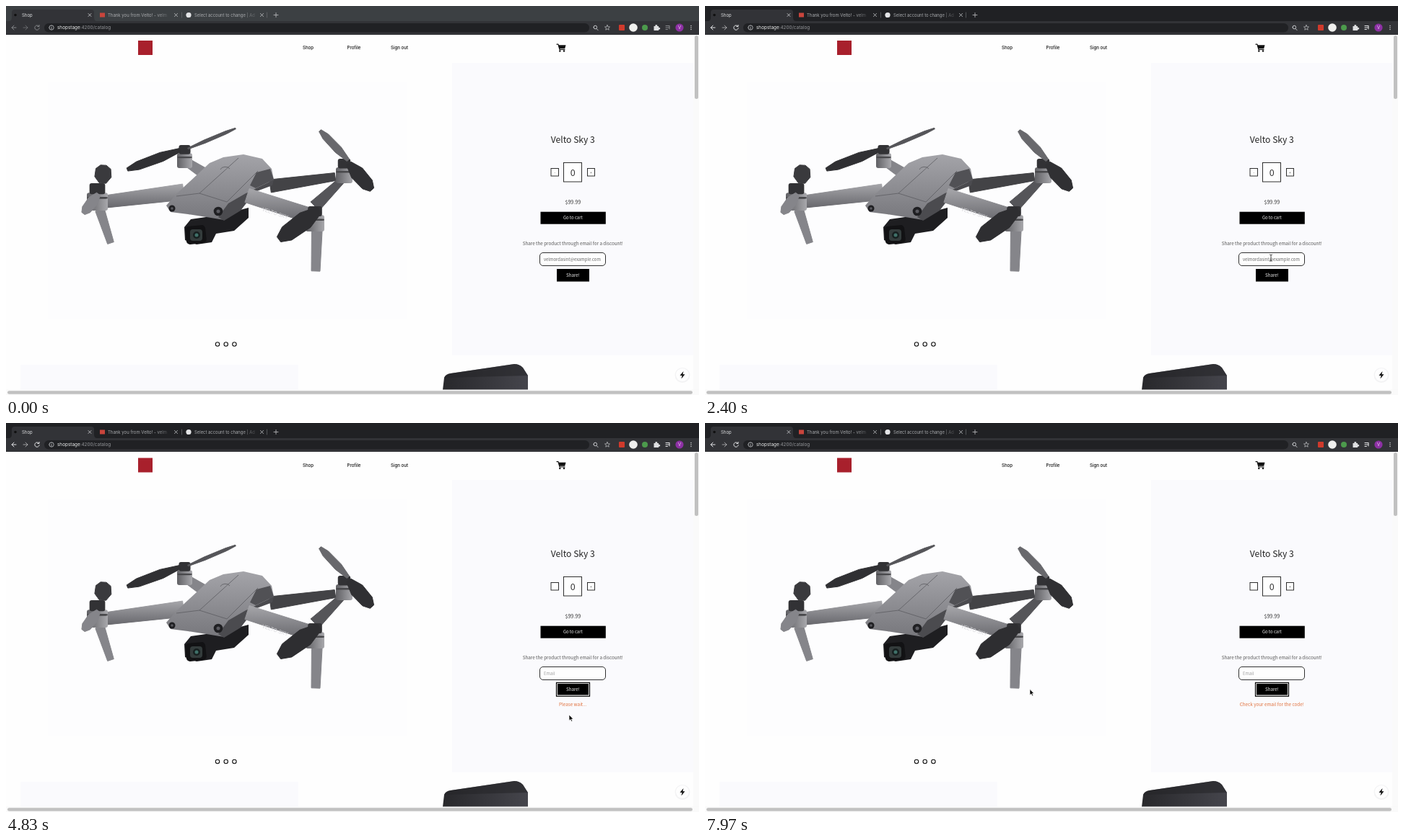
An HTML page for the animation above (8000 ms loop, 960x540 px).

```html
<!DOCTYPE html>
<html lang="en">
<head>
<meta charset="utf-8">
<title>Shop</title>
<style>
html, body { margin: 0; width: 100%; height: 100%; overflow: hidden; background: #fefefe; }
svg { display: block; width: 960px; height: 540px; }
.ui { font-family: Inter, Roboto, sans-serif; }
.shop { font-family: "Noto Sans CJK JP", "Noto Sans CJK SC", "Noto Sans CJK", "Open Sans", sans-serif; font-weight: 300; }
.mid { text-anchor: middle; }
.icon { fill: none; stroke: currentColor; stroke-linecap: round; stroke-linejoin: round; }
</style>
</head>
<body>
<svg id="stage" viewBox="0 0 960 540"></svg>
<script>
const LOOP = 8000;
const WINDOW_FOCUS = 1500, INPUT_SETTLE = 3400, PRESS = 3830, SENT = 4150, DONE = 7720;

const rect = (x, y, w, h, fill, more = "") => `<rect x="${x}" y="${y}" width="${w}" height="${h}" fill="${fill}" ${more}/>`;
const disc = (x, y, r, fill, more = "") => `<circle cx="${x}" cy="${y}" r="${r}" fill="${fill}" ${more}/>`;
const path = (d, fill, more = "") => `<path d="${d}" fill="${fill}" ${more}/>`;
const line = (d, width = 1, more = "") => `<path class="icon" d="${d}" stroke-width="${width}" ${more}/>`;
const text = (x, y, str, size, fill, more = "") => `<text x="${x}" y="${y}" font-size="${size}" fill="${fill}" ${more}>${str}</text>`;
const ramp = (id, from, to, dir = 'x2="0" y2="1"') =>
  `<linearGradient id="${id}" ${dir}><stop stop-color="${from}"/><stop offset="1" stop-color="${to}"/></linearGradient>`;
const fade = (id, x) =>
  `<linearGradient id="${id}" gradientUnits="userSpaceOnUse" x1="${x}" x2="${x + 20}"><stop stop-color="#a9abae"/><stop offset="1" stop-color="#a9abae" stop-opacity="0.1"/></linearGradient>`;

const defs = `<defs>
  ${ramp("shell", "#a4a4a9", "#77777c")}
  ${ramp("arm", "#a6a6aa", "#67676c")}
  ${ramp("dark", "#4a4a4d", "#242426")}
  ${ramp("metal", "#606064", "#a8a8ac", "")}
  ${ramp("bag", "#28282b", "#45454c", "")}
  ${fade("fadeMail", 208)}${fade("fadeAdmin", 328)}
</defs>`;

function browser() {
  const close = x => line(`M${x - 2} 10.5l4 4m0-4l-4 4`, 0.9);
  const rows = [27.5, 30, 32.5];
  return `<g class="ui">
    ${rect(0, 0, 960, 40, "", 'id="strip"')}
    ${path("M4 21Q8 21 8 16V9Q8 5 12 5H118Q122 5 122 9V16Q122 21 126 21H960V40H0V21Z", "#323337")}
    ${rect(53, 24, 755, 12.5, "#202124", 'rx="6.2"')}
    ${disc(13, 12.5, 1.8, "#111")}
    ${text(22, 14.8, "Shop", 6, "#dedfe1")}
    ${rect(130, 9.5, 7, 6, "#c9453c")}
    ${text(141, 14.8, "Thank you from Velto! - velm", 6, "url(#fadeMail)")}
    ${disc(253, 12.5, 3.6, "#e4e5e7")}
    ${text(261, 14.8, "Select account to change | Ad", 5.9, "url(#fadeAdmin)")}
    <g color="#c0c2c5">${[116, 235.5, 354.5].map(close).join("")}${line("M371 12.5h6m-3-3v6", 0.8)}</g>
    <g color="#6a6c70">${line("M243.5 9v7M361.5 9v7", 0.7)}</g>
    <g id="tools">
      ${line("M14 30H8m3-3l-3 3 3 3")}
      ${line("M24 30h6m-3-3l3 3-3 3", 1, 'opacity="0.6"')}
      ${line("M45.5 28a3.2 3.2 0 1 0 .7 2.7M46 26.5v2h-2.2")}
      ${rows.map(y => line(`M914 ${y}h${y > 31 ? 2.5 : 5}`)).join("")}${line("M919 28v4")}
    </g>
    <g color="#c6c8cb">
      ${line("M63 29.5v2.5M63 27.7v.1M59.8 30a3.2 3.2 0 1 0 6.4 0a3.2 3.2 0 1 0-6.4 0", 0.8)}
      ${line("M814 29.5a2.3 2.3 0 1 0 4.6 0a2.3 2.3 0 1 0-4.6 0M818 31.5l2 2")}
      ${line("M833 26.5l1 2.3 2.5.2-1.9 1.7.6 2.5-2.2-1.4-2.2 1.4.6-2.5-1.9-1.7 2.5-.2z", 0.7)}
    </g>
    <text x="71" y="32.3" font-size="6.4" fill="#96989c"><tspan fill="#eceded">shopstage</tspan>:4200/catalog</text>
    ${rect(849, 26, 8, 8, "#d03a2c", 'rx="1"')}
    ${disc(869, 30, 5.8, "#f0f0ee")}
    ${disc(885, 30, 4, "#4c9a4c")}
    ${path("M897.5 28h2a1.4 1.4 0 1 1 2.6 0h2v2a1.4 1.4 0 1 1 0 2.4v1.6h-6.6z", "#dedfe1")}
    ${disc(933, 30, 5.6, "#8d30a4")}
    ${text(933, 32.2, "V", 6, "#eadcf0", 'class="mid"')}
    ${rows.map(y => disc(949, y, 0.8, "#c6c8cb")).join("")}
  </g>`;
}

function header() {
  const links = [[411, "Shop"], [472.5, "Profile"], [533, "Sign out"]];
  return `<g id="nav">
    ${rect(183, 48, 20, 20, "#a8202c")}
    <g class="ui" font-weight="500">${links.map(([x, s]) => text(x, 60.4, s, 6.1, "#111")).join("")}</g>
    <g color="#111">${line("M763 53.2h2l2 7.3h7", 1.2)}</g>
    ${path("M765 54.3h10.5l-1.3 5h-7.7z", "#111")}
    ${disc(767.3, 62.5, 1.2, "#111")}${disc(773, 62.5, 1.2, "#111")}
  </g>`;
}

// Outline along a straight axis; each profile entry is [share of length, width]
function sweep([x1, y1], [x2, y2], profile, fill) {
  const dx = x2 - x1, dy = y2 - y1, len = Math.hypot(dx, dy);
  const side = sign => ([k, w]) => {
    const off = sign * w / 2 / len;
    return `${(x1 + dx * k - dy * off).toFixed(1)} ${(y1 + dy * k + dx * off).toFixed(1)}`;
  };
  const edge = [...profile.map(side(1)), ...profile.map(side(-1)).reverse()];
  return path(`M${edge.join("L")}Z`, fill, `stroke="${fill}" stroke-linejoin="round"`);
}
const limb = (from, to, w1, w2, fill) => sweep(from, to, [[0, w1], [1, w2]], fill);
const blade = (from, to, w, fill) => sweep(from, to, [[0, w * 0.4], [0.35, w], [0.8, w * 0.9], [1, w * 0.35]], fill);

function motor(x, y, w, h) {
  const band = (k, hh, inset, fill) => rect(x + inset, y + h * k, w - 2 * inset, h * hh, fill, 'rx="3"');
  return band(0.35, 0.65, 1, "url(#metal)") + band(0, 0.4, w * 0.15, "#323235") + band(0.5, 0.07, 1, "#48484b");
}

function eye(x, y, r) {
  return disc(x, y, r, "#1f1f22") + disc(x, y, r * 0.4, "#5a5a60");
}

function drone() {
  const light = "#85858a", mid = "#555559";
  return `<g>
    ${limb([254, 219], [280, 236], 12, 16, light)}
    ${motor(236, 193, 23, 32)}
    ${blade([241, 200], [168, 227], 13, "#303033")}
    ${blade([252, 198], [318, 170], 4.5, mid)}

    ${limb([366, 250], [456, 237], 18, 11, "#434346")}
    ${limb([467, 240], [428, 278], 9, 17, mid)}
    ${motor(456, 212, 25, 34)}
    ${blade([474, 214], [435, 173], 11, "#68686c")}
    ${blade([475, 219], [507, 255], 20, "#303033")}

    ${limb([130, 283], [145, 329], 13, 9, light)}
    ${limb([246, 258], [134, 272], 22, 17, "url(#arm)")}
    ${motor(111, 246, 31, 38)}
    ${blade([134, 246], [135, 221], 23, "#3a3a3d")}
    ${blade([128, 261], [107, 288], 15, light)}

    ${path("M247 307L256 296 298 290 336 280 336 294 316 312 291 316 285 328 264 331 248 325Z", "#1e1e21")}
    ${path("M222 277L236 261 282 218 301 210 329 206 355 212 368 226 371 241 334 259 302 297 284 294 252 289 228 286Z", "url(#shell)")}
    ${path("M334 259L371 241 369 249 345 258 325 284 302 298 294 293 308 274Z", "#4b4b4f")}
    ${path("M338 249L347 231 366 226 371 241 346 253Z", "#515155")}
    ${path("M236 264L268 260 306 272M268 260L322 211M306 272L349 229M297 227a7 5 0 0 1 13-1", "none", 'stroke="#5c5c61" stroke-width="0.8"')}
    ${eye(230, 281, 4.5)}${eye(294, 285, 6.3)}
    ${rect(249, 305, 28, 25, "#121214", 'rx="5" transform="rotate(-6 263 318)"')}
    ${rect(255, 310, 17, 16, "#343c3c", 'rx="4"')}
    ${disc(264, 318, 5, "#172020")}${disc(264, 318, 2.5, "#3f7068")}

    ${limb([334, 263], [418, 290], 20, 21, "url(#arm)")}
    ${text(354, 284, "VELTO SKY", 7, "#d8d8dc", 'class="ui" transform="rotate(18 354 284)"')}
    ${limb([431, 304], [429, 368], 15, 12, light)}
    ${motor(414, 278, 28, 35)}
    ${blade([434, 283], [378, 324], 25, "#2e2e31")}
  </g>`;
}

function page() {
  return `${rect(0, 40, 960, 500, "#fefefe")}
    ${rect(618, 79, 334, 406, "#fafafd")}
    ${rect(58, 105, 497, 330, "#fdfdfe")}
    ${rect(20, 498, 385, 35, "#fafafd")}
    ${header()}${drone()}
    <g id="dots">${[0, 1, 2].map(i => disc(293 + i * 11.7, 469.5, 2.7, "#fefefe", 'stroke="#111" stroke-width="1.1"')).join("")}</g>
    ${path("M605 533L607 516Q609 511 616 510L704 497Q711 497 716 502L723 513V533Z", "url(#bag)")}
    ${path("M607 516Q609 511 616 510L704 497Q711 497 716 502L723 513Z", "#252528", 'opacity="0.6"')}
    ${disc(937, 512.5, 10.5, "#f3f3f4")}${disc(937, 512, 9, "#fefefe")}
    ${path("M938.5 507l-5 6h3l-1 4.5 5-6.2h-3z", "#111")}
    ${rect(952, 40, 8, 493, "#fafafa")}${rect(954, 41, 5, 88, "#c1c1c1", 'rx="2.5"')}
    ${rect(0, 532.5, 960, 7.5, "#fafafa")}${rect(2, 534.2, 949, 4.6, "#c1c1c1", 'rx="2.3"')}`;
}

function panel() {
  const box = (x, y, w, h, more = "") => rect(x, y, w, h, "#fefefe", `stroke="#1a1a1a" stroke-width="0.9" ${more}`);
  const mid = (y, str, size, fill, more = "") => text(785.3, y, str, size, fill, `class="mid" ${more}`);
  return `<g class="shop">
    <g id="order">
      ${mid(190, "Velto Sky 3", 12.1, "#222")}
      ${box(755, 225.5, 10.5, 10.5)}${box(772.5, 217.5, 25, 26.5)}${box(805.5, 225.5, 10, 10.5)}
      ${text(760.3, 232.7, "-", 5, "#555", 'class="mid" id="minus"')}
      ${text(810.5, 232.7, "+", 5, "#444", 'class="mid"')}
      ${mid(235.7, "0", 12.5, "#333")}
      ${mid(274.7, "$99.99", 7.1, "#333")}
      ${rect(740.5, 285.7, 90.3, 17, "#000")}
      ${mid(296.4, "Go to cart", 5.9, "#eee")}
      ${box(739.5, 342.5, 91, 18, 'rx="4.5"')}
      ${text(745, 353.5, "", 5.9, "#666", 'id="field"')}
    </g>
    <g id="share">
      ${mid(332.4, "Share the product through email for a discount!", 6.3, "#555")}
      ${rect(762.5, 364.5, 46, 18.8, "#fefefe", 'id="ring" stroke="#000" stroke-width="1.2"')}
      ${rect(763, 365, 45, 17.5, "#000", 'id="button"')}
      ${mid(376.2, "Share!", 6.2, "#eee")}
      ${mid(396.5, "", 6.3, "#e0703c", 'id="notice"')}
    </g>
  </g>`;
}

const cursors = `<g id="cursor">
  ${path("M0 0V8.2L1.9 6.5 3.2 9.3 4.6 8.7 3.3 6H5.8Z", "#000", 'id="arrow" stroke="#fff" stroke-width="0.7"')}
  <g id="beam" color="#222">${line("M-1.6-4.5q1.6 0 1.6 1v7q0 1-1.6 1M1.6-4.5q-1.6 0-1.6 1M0 3.5q0 1 1.6 1", 0.8)}</g>
  ${path("M-1-4.5q1-1 1.6 0v3l3 .8q1 .4.9 1.7l-.7 3.5h-4.3l-2.7-3.5q-.3-1.2 1-.8l1.2.8z", "#fff", 'id="hand" stroke="#111" stroke-width="0.7"')}
</g>`;

const stage = document.getElementById("stage");
stage.innerHTML = defs + page() + panel() + browser() + cursors;
const $ = id => document.getElementById(id);
const attr = (id, name, value) => $(id).setAttribute(name, value);
const show = (id, on) => attr(id, "visibility", on ? "visible" : "hidden");
const shift = (id, y) => attr(id, "transform", `translate(0 ${y})`);

// Each pointer move eases out from wherever the previous one ended
const entry = { at: 400, x: 798, y: 519 };
const moves = [
  { at: 400, for: 430, x: 785, y: 419 },
  { at: 1070, for: 750, x: 784, y: 349.5 },
  { at: 2700, for: 850, x: 782.5, y: 376 },
  { at: 4170, for: 430, x: 780, y: 405 },
  { at: 4950, for: 480, x: 659, y: 411 },
  { at: 5470, for: 260, x: 713, y: 397 },
  { at: 6070, for: 460, x: 780, y: 386 },
  { at: 6700, for: 230, x: 767, y: 391 },
  { at: 7230, for: 240, x: 777, y: 391 },
  { at: 7670, for: 290, x: 450, y: 369.5 }
];

function pointerAt(t) {
  return moves.reduce(([x, y], move) => {
    const k = Math.min(1, Math.max(0, (t - move.at) / move.for));
    const ease = k * (2 - k);
    return [x + (move.x - x) * ease, y + (move.y - y) * ease];
  }, [entry.x, entry.y]);
}

function render(t) {
  const focused = t >= WINDOW_FOCUS, pressed = t >= PRESS, sent = t >= SENT;
  attr("strip", "fill", focused ? "#202124" : "#3c4043");
  attr("tools", "color", focused ? "#e4e5e7" : "#85878a");

  shift("nav", sent ? 0.5 : 0);
  shift("dots", sent ? 0.5 : 0);
  shift("order", sent ? -4 : t >= INPUT_SETTLE ? -0.6 : 0);
  shift("share", sent ? -4 : 0);
  show("minus", !sent);
  show("ring", pressed);
  attr("button", "transform", pressed ? "translate(785.5 373.8) scale(.955 .89) translate(-785.5 -373.8)" : "");
  $("field").textContent = sent ? "Email" : "velmordasint@example.com";
  attr("field", "fill", sent ? "#a0a0a0" : "#666");
  $("notice").textContent = t >= DONE ? "Check your email for the code!" : sent ? "Please wait..." : "";

  const [x, y] = pointerAt(t), lift = sent ? 4 : 0;
  const inside = (left, top, right, bottom) => x > left && x < right && y > top - lift && y < bottom - lift;
  const kind = inside(739, 342, 831, 361) ? "beam" : inside(763, 365, 808, 383) ? "hand" : "arrow";
  ["arrow", "beam", "hand"].forEach(id => show(id, t >= entry.at && id === kind));
  attr("cursor", "transform", `translate(${x} ${y})`);
}

function tick() {
  render(performance.now() % LOOP);
  requestAnimationFrame(tick);
}
tick();
</script>
</body>
</html>
```
